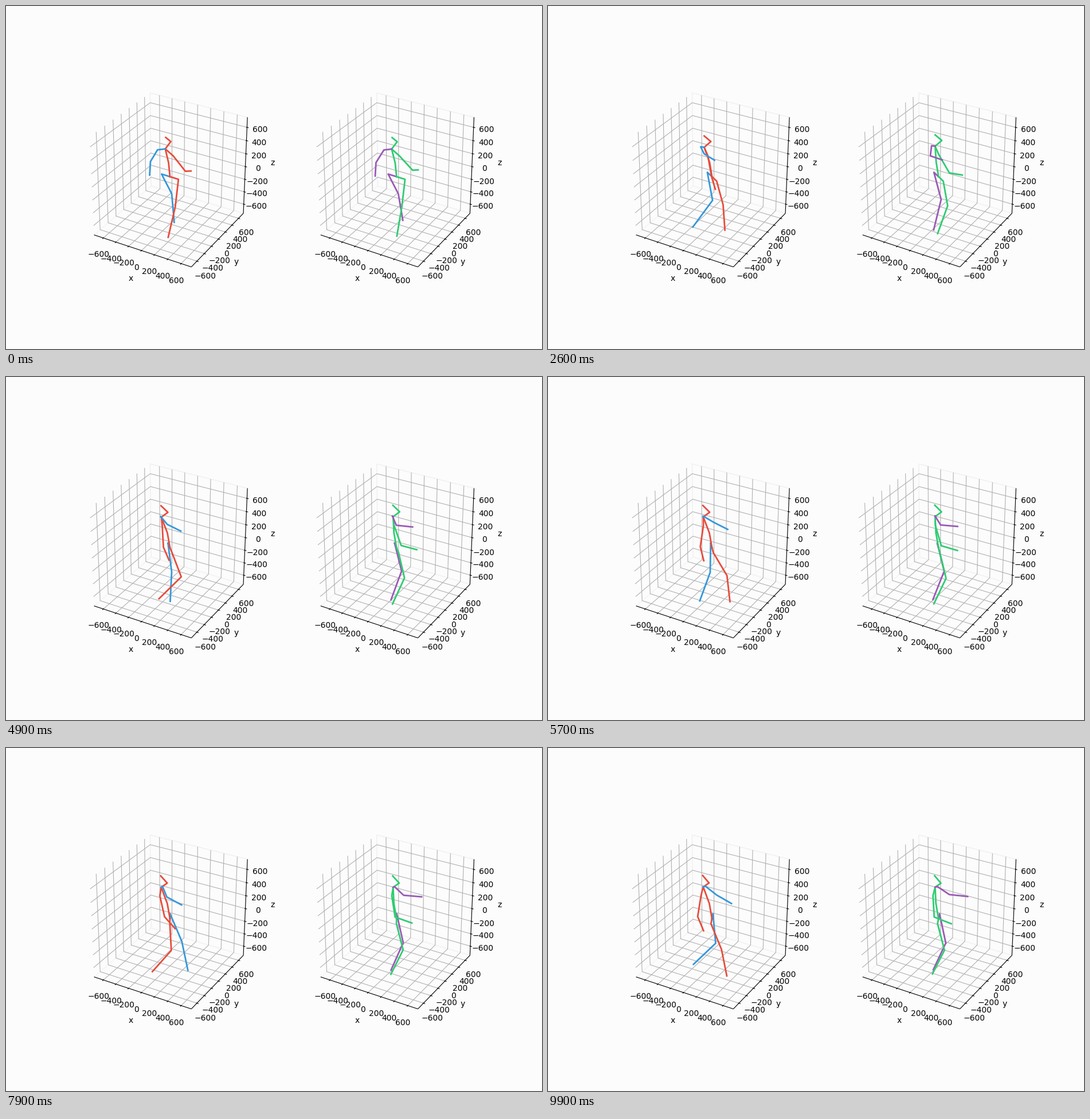
These frames come from a looping animation (935 by 599 pixels, 10000 ms). A matplotlib script:

```python
import numpy as np
import matplotlib.pyplot as plt
from matplotlib.animation import FuncAnimation
from matplotlib.collections import LineCollection

W, H, DPI = 935, 599, 100
FRAMES, STEP = 100, 100
BACK = "#fcfcfc"
LIM = 750
TICKS = range(-600, 601, 200)

plt.rcParams["font.family"] = "DejaVu Sans"
fig = plt.figure(figsize=(W / DPI, H / DPI), dpi=DPI, facecolor=BACK)
ax = fig.add_axes([0, 0, 1, 1])
ax.axis("off")

# Perspective camera: elevation 30, azimuth -60, distance 10
PANEL = 0.775 * W / 2.2
SHIFT = 1.2 * PANEL
CENTER = np.array([0.125 * W + PANEL * 0.95 / 1.85,
                   0.505 * H + PANEL * (0.5 - 0.95 / 1.85)])
SIDE = 1.8294640721620434 * 25 / 24 / np.sqrt(3)
C30 = np.sqrt(3) / 2
RIGHT = np.array([C30, 0.5, 0])
UP = np.array([-0.25, C30 / 2, C30])
EYE = np.array([C30 / 2, -0.75, 0.5])


def project(p):
    """Unit-cube points (centred on 0) to pixels in the first panel."""
    q = np.asarray(p, float) * SIDE
    k = PANEL / 0.185 / (10 - q @ EYE)
    return CENTER + np.stack([q @ RIGHT * k, -(q @ UP) * k], axis=-1)


def strokes(paths, dx, color, width, z):
    segs = [project(p) + (dx, 0) for p in paths]
    ax.add_collection(LineCollection(segs, colors=color, linewidths=width,
                                     zorder=z), autolim=False)


def label(p, dx, text, va):
    x, y = project(p) + (dx, 0)
    ax.text(x, y, text, ha="center", va=va, fontsize=10, color="black")


def draw_box(dx):
    a, out, mid = 0.5, 0.5858, 0.6865
    wall = [(-a, a, -a), (-a, a, a), (a, a, a), (a, a, -a), (-a, a, -a)]
    floor = [(-a, -a, -a), (-a, a, -a), (a, a, -a), (a, -a, -a), (-a, -a, -a)]
    strokes([wall], dx, "#f0f0f0", 1, 0.5)
    strokes([floor], dx, "#f4f4f4", 1, 0.6)

    grid, marks = [], []
    for v in TICKS:
        t = v / (2 * LIM)
        grid += [[(t, -a, -a), (t, a, -a), (t, a, a)],
                 [(a, t, -a), (-a, t, -a), (-a, t, a)],
                 [(-a, -a, t), (-a, a, t), (a, a, t)]]
        lo, hi = a - 0.008, a + 0.016
        marks += [[(t, -lo, -a), (t, -hi, -a)],
                  [(lo, t, -a), (hi, t, -a)],
                  [(lo, a, t), (hi, a, t)]]
        text = str(v).replace("-", "\u2212")
        for p in [(t, -out, -out), (out, t, -out), (out, out, t)]:
            label(p, dx, text, "top")
    axes = [[(-a, -a, -a), (a, -a, -a)],
            [(a, -a, -a), (a, a, -a)],
            [(a, a, -a), (a, a, a)]]
    strokes(grid, dx, "#b0b0b0", 0.8, 1)
    strokes(axes + marks, dx, "black", 0.8, 1.5)
    label((0, -mid, -mid), dx, "x", "center")
    label((mid, 0, -mid), dx, "y", "center")
    label((mid, mid, 0), dx, "z", "center")


# Walk cycle over the whole loop; lengths in millimetres
t = np.arange(FRAMES) * STEP / 1000
cycle = 0.38 + 0.27 * t
heading = np.radians(88 - 74 * (1 - np.exp(-t / 5)))


def wave(phase, peak, harmonic=1):
    return np.cos(2 * np.pi * harmonic * (phase - peak))


def vec(fwd, side, up):
    """Body-frame vector for every frame."""
    return np.stack([v + 0 * t for v in (fwd, side, up)], axis=-1)


def bone(length, fwd, side):
    """Hanging bone of fixed length with a given forward and side reach."""
    return vec(fwd, side, -np.sqrt(np.maximum(length**2 - fwd**2 - side**2, 0)))


def to_pixels(p):
    """Turn body-frame points to the heading and project them."""
    fwd, side, up = np.moveaxis(p, -1, 0)
    c, s = np.cos(heading)[:, None], np.sin(heading)[:, None]
    world = np.stack([fwd * c + side * s, fwd * s - side * c, up], axis=-1)
    return project(world / (2 * LIM))


def leg(root, sign, phase, gain, shin):
    hip = root + vec(0, 133 * sign, 0)
    knee = hip + bone(443, 90 + gain * 105 * wave(phase, 0.88), -40 * sign)
    swing = 190 * wave(phase, 0.08) + 60 * wave(phase, 0.92, 2)
    foot = knee + bone(454, shin + gain * swing, -40 * sign)
    return [root, hip, knee, foot]


def arm(neck, sign, upper, fore):
    shoulder = neck + vec(-15 * sign, 130 * sign, -58)
    elbow = shoulder + bone(279, upper, 140 * sign)
    hand = elbow + bone(252, fore, -45)
    return [neck, shoulder, elbow, hand]


def add_figure(dx, near, far, lean, gain, shin, near_arm, far_arm):
    """Near side is the right-hand limbs, far side the left-hand ones."""
    root = vec(0, 0, 0)
    spine = vec(-35, 0, 230)
    neck = vec(lean, 0, 475)
    head = neck + vec(80, 35, 82)
    top = head + vec(-85, -25, 92)
    chains = [(far, leg(root, -1, cycle + 0.5, gain, shin)),
              (near, leg(root, 1, cycle, gain, shin)),
              (near, [root, spine, neck, head, top]),
              (near, arm(neck, 1, *near_arm)),
              (far, arm(neck, -1, *far_arm))]
    parts = []
    for color, joints in chains:
        path = to_pixels(np.stack(joints, axis=1)) + (dx, 0)
        line, = ax.plot([], [], color=color, lw=2, zorder=3)
        parts.append((line, path))
    return parts


for dx in (0, SHIFT):
    draw_box(dx)

# Left panel keeps walking; right panel settles into a still, bent pose
beat = wave(cycle, 0.4)
parts = add_figure(
    0, "#e74c3c", "#3498db", lean=-115, gain=1, shin=-110,
    near_arm=(10 + 70 * beat, 100 + 50 * beat + 70 * np.exp(-2 * t)),
    far_arm=(100 - 60 * beat, 200 - 155 * np.exp(-t / 1.2)))
parts += add_figure(
    SHIFT, "#2ecc71", "#9b59b6", lean=-45 - 75 * np.exp(-t),
    gain=np.exp(-t / 0.6), shin=-170 + 115 * np.exp(-t / 2.2),
    near_arm=(100 - 7 * t, 220),
    far_arm=(20 + 13 * t, 245 - 200 * np.exp(-t / 1.6)))
ax.set(xlim=(0, W), ylim=(H, 0))


def update(i):
    for line, path in parts:
        line.set_data(path[i, :, 0], path[i, :, 1])
    return [line for line, _ in parts]


update(0)
anim = FuncAnimation(fig, update, frames=FRAMES, interval=STEP, repeat=True,
                     repeat_delay=0)
plt.show()
```
